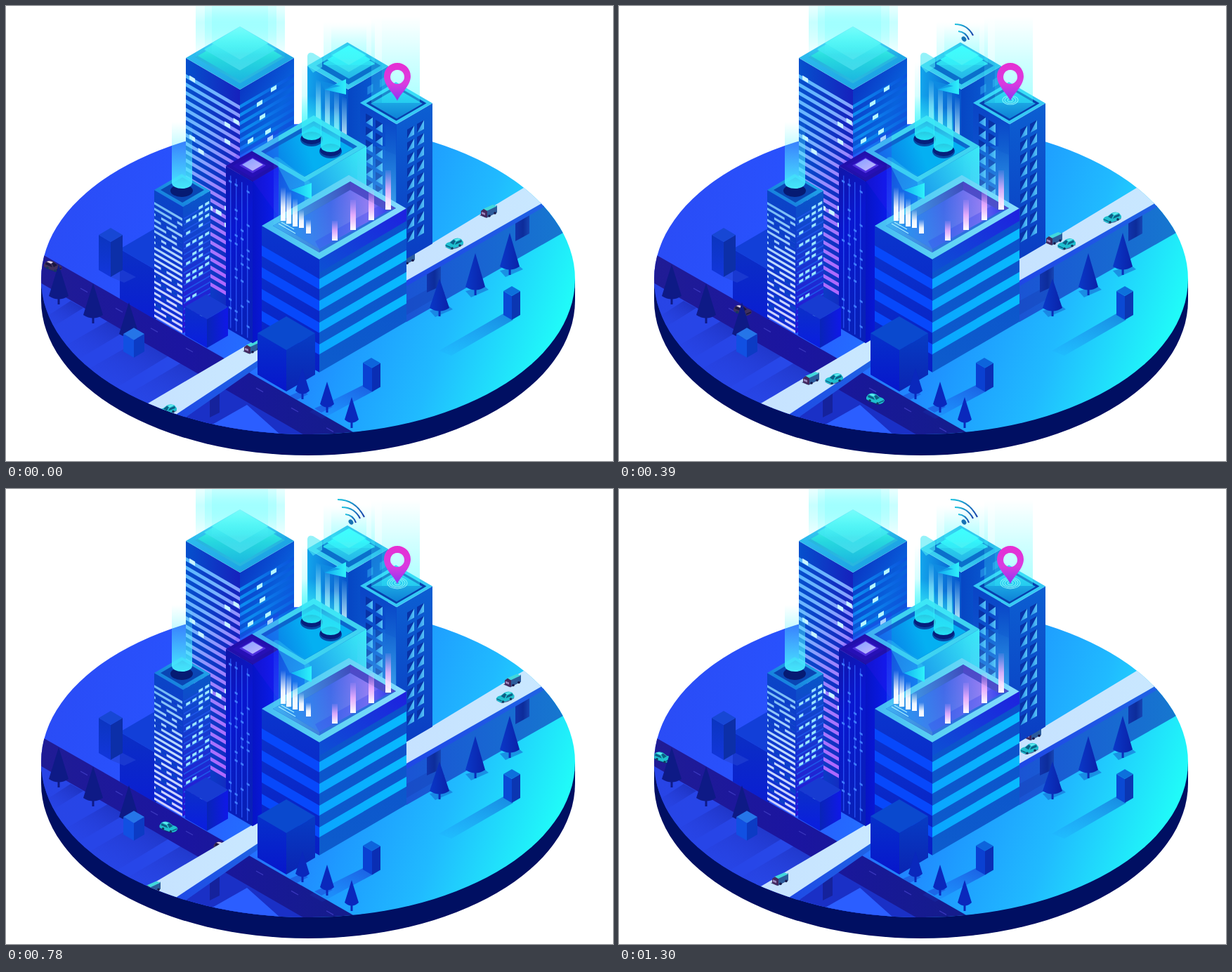
Write an HTML page that moves like this. It is 864 px wide and 648 px high and loops after 1430 ms.

```html
<!DOCTYPE html>
<html lang="en">
<head>
<meta charset="utf-8">
<title>Isometric city</title>
<style>
html, body { margin: 0; width: 100%; height: 100%; overflow: hidden; background: #fff; }
svg { display: block; width: 100vw; height: 100vh; }
</style>
</head>
<body>
<svg id="stage" viewBox="0 0 864 648"></svg>
<script>
const SLOPE = 0.583;
const STEP = 130, STEPS = 11;
const defs = [], out = [];
let seed = 7;
const random = () => (seed = (seed * 16807) % 2147483647) / 2147483647;
const put = s => out.push(s);

// Gradient over the shape's box; each stop is "offset colour [opacity]".
function grad(stops, x1 = 0, y1 = 0, x2 = 0, y2 = 1) {
  const id = 'g' + defs.length;
  const body = stops.map(s => {
    const [o, c, a = 1] = s.split(' ');
    return `<stop offset="${o}" stop-color="${c}" stop-opacity="${a}"/>`;
  }).join('');
  defs.push(`<linearGradient id="${id}" x1="${x1}" y1="${y1}" x2="${x2}" y2="${y2}">${body}</linearGradient>`);
  return `url(#${id})`;
}
const across = (...s) => grad(s, 0, 0, 1, 0);
const down = (...s) => grad(s);
const slant = (...s) => grad(s, 0, 1, 1, 0);
const path = (d, fill, extra = '') => put(`<path d="${d}" fill="${fill}" ${extra}/>`);
const poly = (pts, fill, extra) => path('M' + pts + 'Z', fill, extra);
const rect = (x, y, w, h, fill) => put(`<rect x="${x}" y="${y}" width="${w}" height="${h}" fill="${fill}"/>`);
const ellipse = (x, y, rx, ry, fill, extra = '') =>
  put(`<ellipse cx="${x}" cy="${y}" rx="${rx}" ry="${ry}" fill="${fill}" ${extra}/>`);
const diamond = (x, y, r, fill, extra) => {
  const h = r * SLOPE;
  poly(`${x - r},${y} ${x},${y - h} ${x + r},${y} ${x},${y + h}`, fill, extra);
};
const slab = (x, y, w, h, dir) =>
  `M${x},${y}l${w},${w * SLOPE * dir}v${h}l${-w},${-w * SLOPE * dir}Z`;

// Block given by its left roof corner, the widths of both faces and its height.
function block(x, y, a, b, h, [top, left, right]) {
  const s = SLOPE;
  path(slab(x, y, a, h, 1), left);
  path(slab(x + a, y + a * s, b, h, -1), right);
  path(`M${x},${y}l${a},${a * s}l${b},${-b * s}l${-a},${-a * s}Z`, top);
}
function bands(x, y, w, dir, count, gap, h, fill) {
  let d = '';
  for (let i = 0; i < count; i++) d += slab(x, y + i * gap, w, h, dir);
  path(d, fill);
}
function windows(x, y, w, dir, cols, rows, gap, chance, fill, ww = 5, wh = 4) {
  let d = '';
  for (let r = 0; r < rows; r++) for (let c = 0; c < cols; c++) {
    if (random() > chance) continue;
    const dx = (c + 0.25) * w / cols;
    d += slab(x + dx, y + r * gap + dx * SLOPE * dir, ww, wh, dir);
  }
  path(d, fill);
}
function tree(x, y, h, w, fill) {
  rect(x - 1.5, y + h, 3, 9, fill);
  path(`M${x},${y}L${x + w},${y + h - 3}Q${x},${y + h + 6} ${x - w},${y + h - 3}Z`, fill);
}
const beam = (x, w, y, h, a) =>
  rect(x, y, w, h, down('0 #6ff 0', `.5 #5ff ${a * 0.6}`, `1 #3ff ${a}`));

function ground() {
  ellipse(430, 419, 380, 221, '#000f62');
  rect(50, 389, 760, 30, '#000f62');
  ellipse(430, 389, 380, 221, grad(['0 #2a4cf6', '.25 #2853ff', '.45 #246fff', '.62 #1e9bff', '.78 #20baff', '1 #20fff8'], 0, .4, 1, .6));
  put('<g clip-path="url(#disc)">');
  poly('50,393 340,560 440,615 240,615 50,500', '#2742e0', 'opacity=".75"');
  const shade = slant('0 #2a44e6 0', '1 #1a2cb4 .9');
  for (const p of ['50,447 92,420 110,430 62,460', '82,485 150,446 175,460 100,505',
    '112,520 200,470 240,493 150,548', '165,558 255,505 310,530 200,580'])
    poly(p, shade);
  poly('212,600 345,523 440,612 350,630', '#1a30c6');
  poly('292,597 343,568 390,610 330,620', '#2b5eff');
  poly('40,347 505,613 440,620 40,389', across('0 #201c94', '.45 #1b15a0', '1 #141d8a'));
  for (let i = 0; i < 8; i++)
    path(`M${106 + i * 50},${402 + i * 28.4}l10,5.6`, 'none', 'stroke="#3a37bd" stroke-width="1.3"');
  // Shadows on the right half
  poly('570,396 765,284 800,319 570,450', across('0 #1a54d4', '1 #1678cf'));
  poly('570,420 610,398 625,408 570,440', '#1646be', 'opacity=".5"');
  const soft = slant('0 #1a78f0 0', '1 #1680dd .9');
  poly('708,438 616,491 634,498 722,447', soft);
  poly('508,540 432,578 450,588 524,548', slant('0 #1a60f0 0', '1 #1a55dd .9'));
  for (const [x, y] of [[617, 433], [668, 405], [717, 376]])
    poly(`${x - 14},${y + 1} ${x + 13},${y - 6} ${x + 19},${y - 1} ${x - 6},${y + 10}`, '#1670d8', 'opacity=".65"');
  for (const [x, y] of [[422, 552], [457, 570]])
    poly(`${x - 18},${y + 3} ${x},${y - 5} ${x + 8},${y + 1} ${x - 8},${y + 9}`, '#1b50dc', 'opacity=".6"');
  put('</g>');
  block(162, 346, 50, 48, 71, ['#123fd8', down('0 #0b2fc4', '1 #0a1ed2'), '#0a24a8']);
  block(132, 326, 17, 17, 50, ['#1747d4', down('0 #0b35bf', '1 #1236dc'), '#0c2fa8']);
  poly('149,386 166,376 185,386 168,394', '#2444d6', 'opacity=".6"');
}

function bridge() {
  const pillar = across('0 #1034ac', '.55 #0d2c9a', '1 #1646b4');
  poly('599,378 619,366 619,399 599,408', pillar);
  poly('725,308 745,296 745,324 725,335', pillar);
  poly('290,554 304,546 304,579 290,586', '#15229c');
  const side = across('0 #1e47e6', '1 #1f62e4');
  poly('570,390 768,275 768,285 570,399', side);
  poly('232,584 358,504 358,514 244,594', side);
  const deck = across('0 #c6e2ff', '1 #c9e8ff');
  poly('570,360 745,254 775,274 570,391', deck);
  poly('358,474 190,573 228,591 358,505', deck);
}

function towerA() {
  block(256, 74, 77, 77, 320, [grad(['0 #35c5f2', '1 #159be0'], 0, 0, 1, 1),
    across('0 #0550cd', '1 #1621bd'), grad(['0 #0a26bb', '.4 #0863dd', '1 #2810d5'], 0, 0, .35, 1)]);
  bands(256, 97, 77, 1, 24, 12, 5.6, grad(['0 #55baff', '.35 #79b1ff', '.6 #9a86ff', '1 #ae68ff'], 0, 0, .4, 1));
  bands(333, 141, 77, -1, 20, 12, 5, grad(['0 #0a52dc', '.6 #0c8df0', '1 #3520ff'], 1, 0, .3, 1));
  windows(258, 97, 75, 1, 6, 16, 12, .16, '#c9f5ff', 8, 6);
  for (const [x, y] of [[377, 117], [357, 138], [369, 178], [344, 191], [372, 188], [361, 157]])
    path(slab(x, y, 8, 6, -1), '#b5f7ff');
  diamond(333, 73, 64, '#28b7df');
  const glow = '.1 #2ce9ee';
  diamond(333, 71, 60, down('0 #3fd', '1 #1cb8e0'));
  diamond(333, 62, 51, down(glow, '1 #43d9ea'));
  diamond(333, 53, 40, down('0 #2af5ed', '1 #4fe3ef'));
  const pale = a => down(`0 #bff 0`, `.45 #9ff ${a}`, `1 #5ff 0`);
  rect(270, -20, 127, 95, pale(.55));
  rect(283, -25, 102, 95, pale(.5));
  rect(293, -30, 80, 100, pale(.5));
}

function towerB() {
  block(429, 85, 58, 57, 150, [slant('0 #45dff5', '1 #18a0e2'),
    across('0 #13a5ec', '1 #0654cc'), across('0 #0646c4', '1 #0a62d6')]);
  diamond(487.5, 85, 46, '#0b70cc');
  diamond(488, 82, 37, down('0 #2be8f0', '1 #26b7e8'));
  diamond(488, 76, 31, down('0 #2ff', '1 #3cd9ee'));
  diamond(488, 70, 24, down('0 #3ff', '1 #51ebf1'));
  const bar = down('0 #bff 0', '1 #e4feff .95');
  for (const [x, y] of [[441, 104], [454, 112], [467, 120], [478, 128]])
    path(slab(x, y, 7, 62, 1), bar);
  windows(510, 118, 35, -1, 2, 6, 19, .9, '#1e82e0', 8, 11);
  path('M429,85V71q1,-6 8,-4l13,8v12l-13,8Z', '#4ceaf5', 'opacity=".6"');
  rect(421, 80, 9, 105, down('0 #3ff 0', '1 #3ff .45'));
  poly('453,119 484,104 484,126', across('0 #10a6f0', '1 #2ff0fa'));
  poly('453,119 446,106 476,114', '#0f8fe2', 'opacity=".7"');
  beam(452, 73, 22, 62, .28);
  beam(463, 50, 28, 48, .25);
}

function towerC() {
  block(504, 138, 52, 51, 200, ['#35c9f4', down('0 #0a44c6', '.6 #0c5ed4', '1 #0a28c0'),
    down('0 #0c5fd2', '1 #0a3cc2')]);
  diamond(555.5, 138.5, 43, '#083fae');
  diamond(556, 139, 37, down('0 #28c9f0', '1 #0d80d6'));
  const panes = (x, y, dir, rows) => {
    for (let i = 0; i < rows; i++) {
      path(slab(x, y + i * 18.5, 10, 13, dir), '#0832a6');
      const top = y + i * 18.5;
      poly(`${x},${top + 13} ${x + 10},${top + 13 + dir * 5.8} ${x + 10},${top + dir * 5.8}`, across('0 #1d86e6', '1 #5ac3f5'));
    }
  };
  panes(512, 153, 1, 7);
  panes(526, 162, 1, 7);
  panes(571, 176, -1, 9);
  panes(585, 168, -1, 9);
  rect(540, 165, 15, 130, down('0 #2ad 0', '1 #6cf .5'));
  beam(520, 69, 15, 123, .28);
  beam(535, 54, 15, 123, .2);
}

function blockE() {
  block(350, 207, 75, 88, 120, ['#3ed3f1', across('0 #1020cc', '1 #0a6fee'),
    slant('0 #0a72e8', '1 #3cf0f6')]);
  poly('363,207 438,164 500,200 425,243', '#0c66cd');
  poly('369,210 438,171 494,203 425,243', grad(['0 #0b78e6', '1 #04b0f2'], 0, .6, .5, .5));
  for (const [x, y] of [[435, 188], [462, 205]]) {
    ellipse(x, y + 2, 16, 10, '#0748a4');
    ellipse(x, y, 15, 9, '#061f7c');
    path(`M${x - 14},${y - 60}h28v55a14,8 0 0 1 -28,0Z`, down('0 #3ff 0', '.5 #3ef5fa .55', '1 #25e5f6'));
  }
  rect(500, 200, 40, 85, down('0 #3cf .15', '1 #9df .25'));
}

function towerD() {
  block(211, 262, 41, 39, 180, [slant('0 #1273d9', '1 #24b3ec'),
    down('0 #0b46c6', '1 #122ad6'), down('0 #0858c8', '1 #2a10d8')]);
  bands(211, 279, 40, 1, 21, 8, 3.6, down('0 #6db8f5', '.5 #c3ddff', '1 #d2ceff'));
  windows(211, 278, 38, 1, 5, 20, 8, .22, '#0d40c8', 8, 5);
  bands(253, 302, 38, -1, 19, 8.6, 2, '#1d55e8');
  windows(254, 298, 36, -1, 4, 20, 8.6, .42, '#9ae6ff', 6, 4);
  diamond(251, 262, 31, '#0a46b4');
  ellipse(250, 263, 16, 9, '#061b73');
  path('M236,165h29v87a14.5,8 0 0 1 -29,0Z', down('0 #6ff 0', '.45 #5ef .45', '1 #45eaff'));
}

function towerF() {
  block(313, 228, 38, 37, 230, ['#1a109c', grad(['0 #1016a8', '.4 #0916d0', '1 #0820b8'], 0, 0, .2, 1),
    across('0 #0714c6', '1 #0a1cf0')]);
  diamond(350.5, 228, 28, '#2010a8');
  diamond(351, 227, 19, '#4e35d8');
  diamond(351, 226, 15, grad(['0 #8db9ff', '1 #dcd8ff'], 0, 0, 1, 1));
  for (let x = 319; x < 350; x += 8) rect(x, 238 + (x - 313) * SLOPE, 1.4, 217, '#264ff0');
  windows(315, 246, 34, 1, 4, 18, 12, .35, '#3f7cff', 4, 3);
  path('M330,210L388,176V300L351,249L313,228Z', '#4a18ff', 'opacity=".16"');
}

function blockG() {
  block(364, 313, 82, 124, 161, [across('0 #45bdf3', '.5 #5fd4f4', '1 #8bdcff'),
    down('0 #0a35cd', '1 #081fc5'), down('0 #0b50cb', '1 #0d5ccd')]);
  bands(364, 341, 82, 1, 4, 31, 15, '#0748fb');
  bands(446, 389, 124, -1, 4, 31, 14, across('0 #0aa5ff', '1 #08baff'));
  poly('446,361 570,288 570,306 446,380', slant('0 #0c50d6', '1 #2510e6'), 'opacity=".75"');
  poly('380,313 490,250 555,288 446,351', '#2052d4');
  poly('380,313 490,250 490,262 396,316 446,346 446,351', across('0 #38aaf2', '1 #3c3bb4'));
  poly('396,316 490,262 543,292 446,346', across('0 #1a87ec', '.45 #3f56e4', '.8 #9a6cf0', '1 #3a28ea'));
  poly('490,250 555,288 543,292 490,262', '#4c36c0');
  poly('446,346 543,292 530,285 440,335', '#2418e8', 'opacity=".3"');
  // Glow rising from the courtyard
  path('M381,313V215L432,245V275L490,241V185L555,212V288L446,351Z', down('0 #5df 0', '1 #5cf .28'));
  poly('405,262 435,252 435,275', across('0 #12b2f2', '1 #2ef2fa'));
  path('M381,217q3,-4 9,0l44,35l-30,10Z', '#32c6f5', 'opacity=".4"');
  const white = down('0 #fff 0', '.6 #fff .9', '1 #fff');
  const pink = down('0 #f0a0ff .1', '.5 #ffb8ff .8', '1 #fff');
  for (const [x, y, h] of [[391, 258, 48], [399, 264, 46], [408, 274, 40], [417, 290, 26], [427, 304, 20]])
    rect(x, y, 7, h, white);
  for (const [x, y, h] of [[464, 306, 28], [490, 276, 43], [516, 262, 43], [540, 234, 56]])
    rect(x, y, 8, h, pink);
  path('M388,310l24,14M392,308l18,10', 'none', 'stroke="#a9f0ff" stroke-width="1.3"');
}

function foreground() {
  block(255, 428, 31, 30, 41, ['#173bd1', down('0 #0b2fc8', '1 #0a1de0'), across('0 #0824b8', '1 #1018e8')]);
  block(358, 466, 41, 41, 59, ['#0a49ce', down('0 #0630ca', '1 #0716cc'), down('0 #073cc4', '1 #0a24b2')]);
  block(708, 406, 12, 12, 34, ['#0d70dc', '#0a49d4', '#0b36b2']);
  block(508, 508, 13, 12, 34, ['#0d64dc', '#0a40d2', '#0a2eb4']);
  for (const [x, y, h] of [[617, 388, 45], [668, 352, 51], [717, 323, 51]])
    tree(x, y, h, 14, grad(['0 #0a38c8', '1 #0a22a8'], 0, 0, 1, 0));
  for (const [x, y] of [[422, 516], [457, 535], [492, 557]]) tree(x, y, 35, 10, '#0a28bc');
  for (const [x, y] of [[75, 368], [124, 395], [175, 422]]) tree(x, y, 48, 14, '#0e1a86');
  block(167, 467, 15, 15, 25, ['#2575e8', '#1150e2', '#0c3bc4']);
}

function signals() {
  const pin = down('0 #e62fd2', '.55 #d93be0', '1 #8b36f2');
  const rings = [4, 8, 11, 14];
  rings.forEach((r, i) =>
    ellipse(557, 134, r, r * .57, 'none', `class="signal" data-i="${i}" stroke="#7ff2fa" stroke-width="1.1"`));
  path('M557,135C553,125 538,114 538,100A19,19 0 0 1 576,100C576,114 561,125 557,135ZM557,91a10,10 0 1 0 .1,0Z', pin, 'fill-rule="evenodd"');
  ellipse(491, 47, 3, 4, '#1872b4', 'class="signal" data-i="0" transform="rotate(-35 491 47)"');
  const stroke = grad(['0 #1fc4e0', '1 #1b3fa8'], 0, 0, 1, 1);
  ['M483 36Q494 37 498 48', 'M478 26Q496 26 504 42', 'M472 15Q497 15 510 40'].forEach((d, i) =>
    path(d, 'none', `class="signal" data-i="${i + 1}" stroke="${stroke}" stroke-width="2.1"`));
}

function carShape(body, glass, roof) {
  return `<path d="M-13 5L-5 9L4 7L13 2L8 -2Z" fill="#123070" opacity=".65"/>
    <path d="M-13 3Q-12 -1 -6 -2L-1 -6Q5 -9 10 -6L13 -2V1L8 4L-4 8Q-11 8 -13 3Z" fill="${body}"/>
    <path d="M-6 -1L-1 -5L2 -4L-1 2ZM1 2L3 -2L10 -5L11 -2Z" fill="${glass}"/>
    <path d="M0 -5Q5 -8 9 -6L3 -3Z" fill="${roof}"/>
    <path d="M-12 3L-5 6" stroke="${glass}" stroke-width="1.4"/>
    <circle cx="-3" cy="7" r="1.8" fill="#123a60"/><circle cx="8" cy="3" r="1.8" fill="#123a60"/>`;
}
const SHAPES = {
  cyan: carShape('#1fbfcf', '#0d5f86', '#5eebee'),
  dark: carShape('#40305e', '#1b1640', '#e3d6ee'),
  truck: `<path d="M-13 5L-3 9L12 1L6 -4Z" fill="#1a2460" opacity=".7"/>
    <path d="M-3 -3L12 -9V1L-3 8Z" fill="#2c5c9c"/><path d="M-8 -4L6 -10L12 -8L-3 -1Z" fill="#42d8dc"/>
    <path d="M-11 -1L-7 -4L-2 -1V8L-5 8L-11 5Z" fill="#43295f"/><path d="M-10 0L-5 2V5L-10 3Z" fill="#9b86bd"/>
    <circle cx="1" cy="6" r="1.8" fill="#16184a"/><circle cx="9" cy="2" r="1.8" fill="#16184a"/>`
};
const truckLane = x => 293 + (687 - x) * .575;
const carLane = x => 338 + (638 - x) * .58;
const roadDown = x => 370 + (x - 67) * .578;
const roadUp = x => 583 - (406 - x) * .585;

// Keys are [step, x] pairs; steps past the end wrap into the next loop.
const cars = [
  { layer: 'road', shape: 'dark', lane: roadDown, flip: true, keys: [[0, 67], [2, 142], [3, 176], [5, 263], [7, 354], [9, 453], [10, 505]] },
  { layer: 'road', shape: 'cyan', lane: roadUp, flip: true, keys: [[1, 447], [3, 365], [5, 273], [7, 190], [9, 118], [10, 62]] },
  { layer: 'deck', shape: 'truck', lane: truckLane, keys: [[0, 687], [2, 643], [3, 619], [5, 550]] },
  { layer: 'deck', shape: 'truck', lane: truckLane, keys: [[6, 721], [7, 688], [10, 589], [11, 570]] },
  { layer: 'deck', shape: 'truck', lane: truckLane, keys: [[0, 350], [2, 299], [3, 273], [5, 231], [6, 208]] },
  { layer: 'deck', shape: 'truck', lane: truckLane, keys: [[6, 385], [7, 350], [9, 265], [10, 229]] },
  { layer: 'deck', shape: 'cyan', lane: carLane, keys: [[10, 584], [11, 638], [13, 678], [14, 702], [16, 743]] },
  { layer: 'deck', shape: 'cyan', lane: carLane, keys: [[1, 590], [3, 637], [5, 680], [7, 741], [8, 768]] },
  { layer: 'deck', shape: 'cyan', lane: carLane, keys: [[0, 230], [3, 306], [5, 350], [6, 374]] }
];
function drawCars(layer) {
  cars.forEach((c, i) => {
    if (c.layer === layer) put(`<g id="car${i}">${SHAPES[c.shape]}</g>`);
  });
}

ground();
put('<g clip-path="url(#disc)">');
drawCars('road');
bridge();
drawCars('deck');
put('</g>');
[towerA, towerB, towerC, blockE, towerD, towerF, blockG, foreground, signals].forEach(draw => draw());
const stage = document.getElementById('stage');
stage.innerHTML = `<defs>${defs.join('')}<clipPath id="disc"><ellipse cx="430" cy="389" rx="380" ry="221"/></clipPath></defs>${out.join('')}`;
cars.forEach((c, i) => c.node = document.getElementById('car' + i));
const signalNodes = [...document.querySelectorAll('.signal')];

function valueAt(keys, k) {
  for (let i = 1; i < keys.length; i++) {
    const [k0, x0] = keys[i - 1], [k1, x1] = keys[i];
    if (k >= k0 && k <= k1) return x0 + (x1 - x0) * (k - k0) / (k1 - k0);
  }
  return null;
}
function update(ms) {
  const k = Math.floor(ms / STEP) % STEPS;
  for (const { keys, lane, flip, node } of cars) {
    const x = valueAt(keys, k) ?? valueAt(keys, k + STEPS);
    node.style.display = x === null ? 'none' : '';
    if (x !== null) node.setAttribute('transform', `translate(${x} ${lane(x)})${flip ? ' scale(-1 1)' : ''}`);
  }
  for (const n of signalNodes) n.style.display = k > +n.dataset.i ? '' : 'none';
}
const start = performance.now();
function tick() {
  update(performance.now() - start);
  requestAnimationFrame(tick);
}
tick();
</script>
</body>
</html>
```
